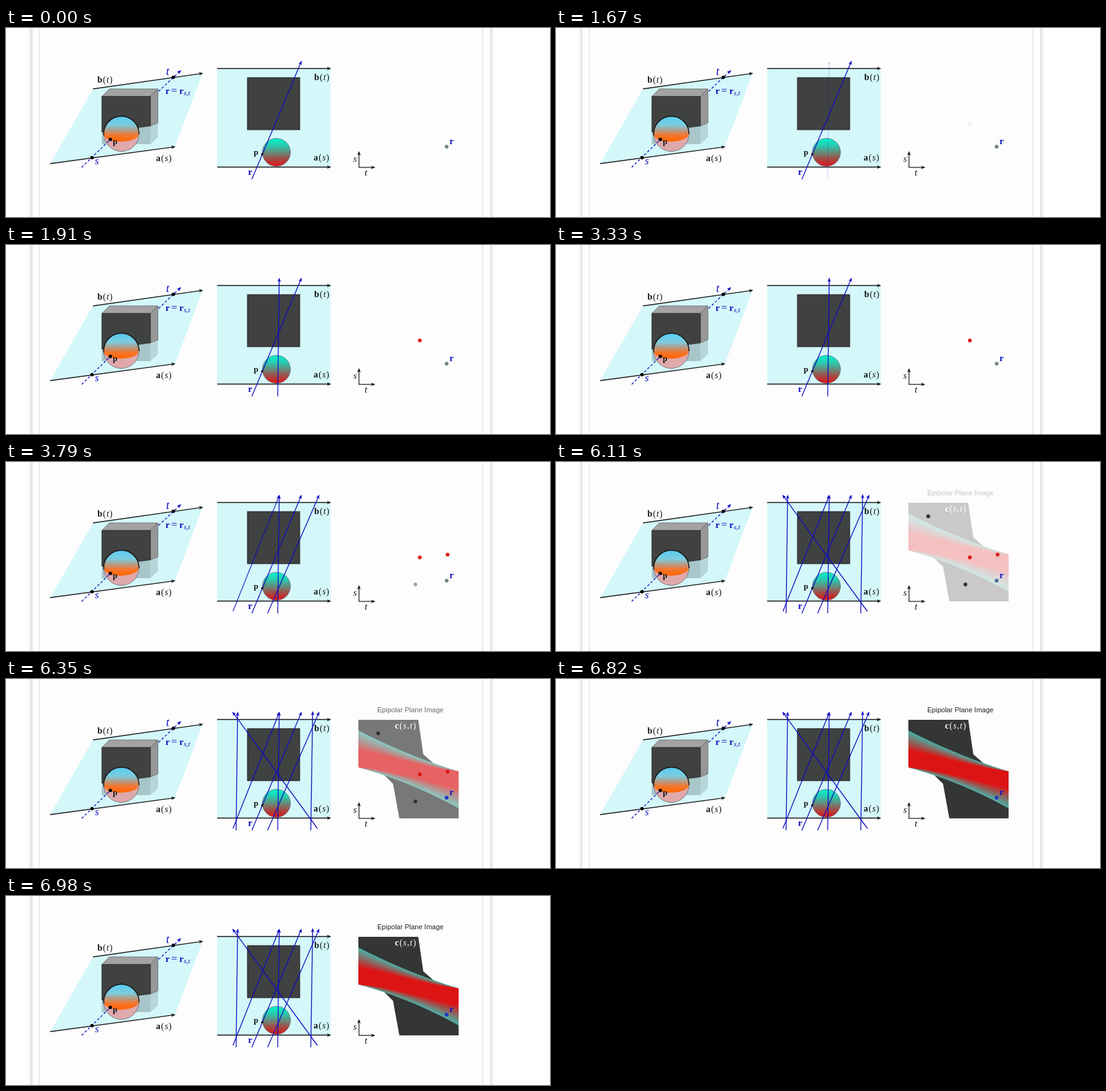
An HTML page with a canvas for the animation above (7.01 s loop, 863 by 301 pixels).

```html
<!DOCTYPE html>
<html lang="en">
<head>
<meta charset="utf-8">
<title>Rays and the epipolar plane</title>
<style>
html, body { margin: 0; width: 100%; height: 100%; overflow: hidden; background: #fff; }
canvas { display: block; }
</style>
</head>
<body>
<canvas id="stage" width="863" height="301"></canvas>
<script>
const W = 863, H = 301, LOOP = 7010;
const BLUE = '#0c0cc0', INK = '#111', PLANE = '#d4f7fa', DARK = '#404141', RED = '#d81a16';
const SERIF = '"Liberation Serif", serif';

// Later rays: foot, tip, fade times, and the matching point in the (s, t) diagram.
const rays = [
  { from: [431, 241], to: [433.5, 52], start: 1650, end: 1910, dot: [656.5, 152], color: RED },
  { from: [415, 241], to: [497, 52], start: 3340, end: 3570, dot: [700.5, 147.5], color: RED },
  { from: [360, 238], to: [434, 52], start: 3690, end: 3930, dot: [649.5, 195], color: '#2d2d2d' },
  { from: [494, 238], to: [359, 52], start: 4060, end: 4400, dot: [590.5, 86.5], color: '#2d2d2d' },
  { from: [365, 241], to: [367.5, 52], start: 4700, end: 4930 },
  { from: [483.5, 241], to: [486.5, 51], start: 5370, end: 5480 }
];

function layer() {
  const canvas = document.createElement('canvas');
  canvas.width = W;
  canvas.height = H;
  return canvas;
}

let g;

function polygon(points, fill, stroke) {
  g.beginPath();
  points.forEach(p => g.lineTo(...p));
  g.closePath();
  g.fillStyle = fill;
  g.fill();
  if (stroke) {
    g.strokeStyle = stroke;
    g.lineWidth = 0.7;
    g.stroke();
  }
}

function dot(x, y, r, color) {
  g.beginPath();
  g.arc(x, y, r, 0, 7);
  g.fillStyle = color;
  g.fill();
}

function line(from, to, color, width = 1.3, dash = []) {
  g.strokeStyle = color;
  g.lineWidth = width;
  g.setLineDash(dash);
  g.beginPath();
  g.moveTo(...from);
  g.lineTo(...to);
  g.stroke();
  g.setLineDash([]);
}

function arrow(from, to, color, width, dash) {
  const angle = Math.atan2(to[1] - from[1], to[0] - from[0]);
  line(from, [to[0] - 4 * Math.cos(angle), to[1] - 4 * Math.sin(angle)], color, width, dash);
  g.save();
  g.translate(...to);
  g.rotate(angle);
  polygon([[0, 0], [-7, -2.8], [-5, 0], [-7, 2.8]], color);
  g.restore();
}

function text(str, x, y, color, style, size = 14) {
  g.font = `${style} ${size}px ${SERIF}`;
  g.fillStyle = color;
  g.fillText(str, x, y);
  return g.measureText(str).width;
}

// A bold symbol followed by italic arguments in brackets.
function symbol(name, args, x, y, color = INK) {
  x += text(name, x, y, color, 'bold') + 1;
  x += text('(', x, y, color, '') + 1;
  for (const c of args) x += text(c, x, y, color, c === ',' ? '' : 'italic') + 1;
  text(')', x, y, color, '');
}

function vertical(y0, y1, ...stops) {
  const gradient = g.createLinearGradient(0, y0, 0, y1);
  stops.forEach(([at, color]) => gradient.addColorStop(at, color));
  return gradient;
}

function page() {
  g.fillStyle = '#fff';
  g.fillRect(0, 0, W, H);
  g.save();
  g.shadowColor = 'rgba(0,0,0,.28)';
  g.shadowBlur = 8;
  g.fillRect(42, -20, 726, H + 40);
  g.restore();
  g.fillStyle = '#fdfdfd';
  g.fillRect(53, 0, 703, H);
  line([52.5, 0], [52.5, H], '#dcdcdc', 1);
  line([756.5, 0], [756.5, H], '#dcdcdc', 1);
}

function perspectiveView() {
  polygon([[138, 97], [312, 72], [268, 189], [70, 216]], PLANE);

  polygon([[152, 166], [229, 156], [229, 185], [152, 185]], '#a8c6c9');
  polygon([[229, 156], [241, 151], [241, 174], [229, 185]], '#b6d5d8');
  polygon([[152, 109], [164, 97], [241, 97], [229, 109]], '#a3a3a3', '#555');
  polygon([[229, 109], [241, 97], [241, 151], [229, 156]], '#979797', '#555');
  polygon([[152, 109], [229, 109], [229, 156], [152, 166]], DARK, '#222');

  dot(183, 168.5, 28, '#dfa9ac');
  g.strokeStyle = '#777';
  g.lineWidth = 1;
  g.stroke();
  g.beginPath();
  g.arc(183, 168.5, 28, Math.PI - 0.1, 0.02);
  g.bezierCurveTo(208, 184, 160, 185, 155.2, 171);
  g.closePath();
  g.fillStyle = vertical(141, 181, [0, '#58cdf2'], [0.35, '#7fcbdc'], [0.55, '#b59b84'],
    [0.75, '#f4752c'], [1, '#ff6500']);
  g.fill();
  g.beginPath();
  g.arc(183, 168.5, 28, Math.PI - 0.1, 0.02);
  g.strokeStyle = INK;
  g.lineWidth = 1.5;
  g.stroke();

  arrow([138, 97], [313, 72], INK, 1.3);
  arrow([70, 216], [269, 189], INK, 1.3);
  line([120, 222], [165, 178], BLUE, 1.3, [4, 3]);
  arrow([242, 101], [278, 67], BLUE, 1.3, [4, 3]);
  dot(136.5, 206.5, 2.8, '#000');
  dot(265.5, 78.5, 2.8, '#000');
  dot(165.5, 177.5, 2.8, '#000');

  symbol('b', 't', 145, 87);
  symbol('a', 's', 238, 212);
  text('p', 169.5, 185, INK, 'bold', 13);
  text('t', 254, 75, BLUE, 'italic', 18);
  text('s', 141, 217, BLUE, 'italic', 16);
  text('r', 253, 105, BLUE, 'bold', 15);
  text('=', 262, 105, BLUE, '', 17);
  text('r', 275, 105, BLUE, 'bold', 15);
  text('s,t', 282, 107, BLUE, 'italic', 11);
}

function planeView() {
  g.fillStyle = PLANE;
  g.fillRect(335, 64, 180, 158);
  g.fillStyle = DARK;
  g.fillRect(383, 79, 83, 83);
  g.strokeStyle = '#222';
  g.lineWidth = 1;
  g.strokeRect(383, 79, 83, 83);
  dot(429, 198, 22.3, vertical(176, 220, [0, '#08f2cc'], [0.25, '#27cdb0'], [0.5, '#648d7c'],
    [0.72, '#a04f48'], [1, '#e01414']));
  g.strokeStyle = '#667';
  g.lineWidth = 0.8;
  g.stroke();
  arrow([335, 64.5], [516, 64.5], INK, 1.3);
  arrow([335, 221.5], [516, 221.5], INK, 1.3);
  symbol('b', 't', 489, 83);
  symbol('a', 's', 488, 211);
  text('p', 393, 202, INK, 'bold', 13);
  text('r', 384, 234, BLUE, 'bold', 15);
  arrow([390, 241], [469, 52], BLUE, 1.3);
  dot(406.5, 201, 1.8, '#000');
}

function axes() {
  arrow([560, 222], [560, 196], INK, 1.2);
  arrow([559.5, 222], [586, 222], INK, 1.2);
  text('s', 551, 213, INK, 'italic', 14);
  text('t', 569, 235, INK, 'italic', 15);
}

function epipolarImage() {
  polygon([[559, 65], [654, 65], [662, 120], [685, 140], [718, 147], [718, 222], [624, 222],
    [614, 167], [597, 150], [559, 140]], '#343535');
  const curve = (u, a, b, c) => a * (1 - u) ** 2 + 2 * b * u * (1 - u) + c * u * u;
  for (let x = 559; x < 718; x++) {
    const u = (x - 558.5) / 159;
    const top = curve(u, 82, 123, 147), bottom = curve(u, 141, 162, 206);
    const upper = 0.55 * (1 - u), lower = 1 - 0.55 * u;
    g.fillStyle = vertical(top, bottom, [0, '#4bb0a4'], [upper * 0.5, '#8a6660'], [upper, '#dc1414'],
      [lower, '#dc1414'], [(1 + lower) / 2, '#8a6660'], [1, '#4bb0a4']);
    g.fillRect(x, top, 1, bottom - top);
  }
  symbol('c', 's,t', 617, 79, '#fff');
  g.font = '11px "Liberation Sans", sans-serif';
  g.fillStyle = '#222';
  g.fillText('Epipolar Plane Image', 589, 53);
}

function paint(...parts) {
  const canvas = layer();
  g = canvas.getContext('2d');
  parts.forEach(part => part());
  return canvas;
}

const scene = paint(page, perspectiveView, planeView, axes);
const epi = paint(epipolarImage);
const screen = document.getElementById('stage').getContext('2d');
const ramp = (t, start, end) => Math.min(1, Math.max(0, (t - start) / (end - start)));

function draw(t) {
  g = screen;
  g.globalAlpha = 1;
  g.drawImage(scene, 0, 0);
  for (const ray of rays) {
    const shown = ramp(t, ray.start, ray.end);
    if (!shown) continue;
    g.globalAlpha = Math.min(1, shown * 2);
    arrow(ray.from, ray.to, BLUE, 1.3);
    g.globalAlpha = shown;
    if (ray.dot) dot(...ray.dot, 3, ray.color);
  }
  const reveal = ramp(t, 5960, 6550);
  g.globalAlpha = reveal;
  g.drawImage(epi, 0, 0);
  g.globalAlpha = 1;
  dot(699, 189, 3, '#75878a');
  g.globalAlpha = Math.min(1, reveal * 1.5);
  dot(699, 189, 3, '#2238c8');
  g.globalAlpha = 1;
  text('r', 703.5, 185, '#1414c8', 'bold', 15);
}

const begin = performance.now();
function tick() {
  draw((performance.now() - begin) % LOOP);
  requestAnimationFrame(tick);
}
tick();
</script>
</body>
</html>
```
